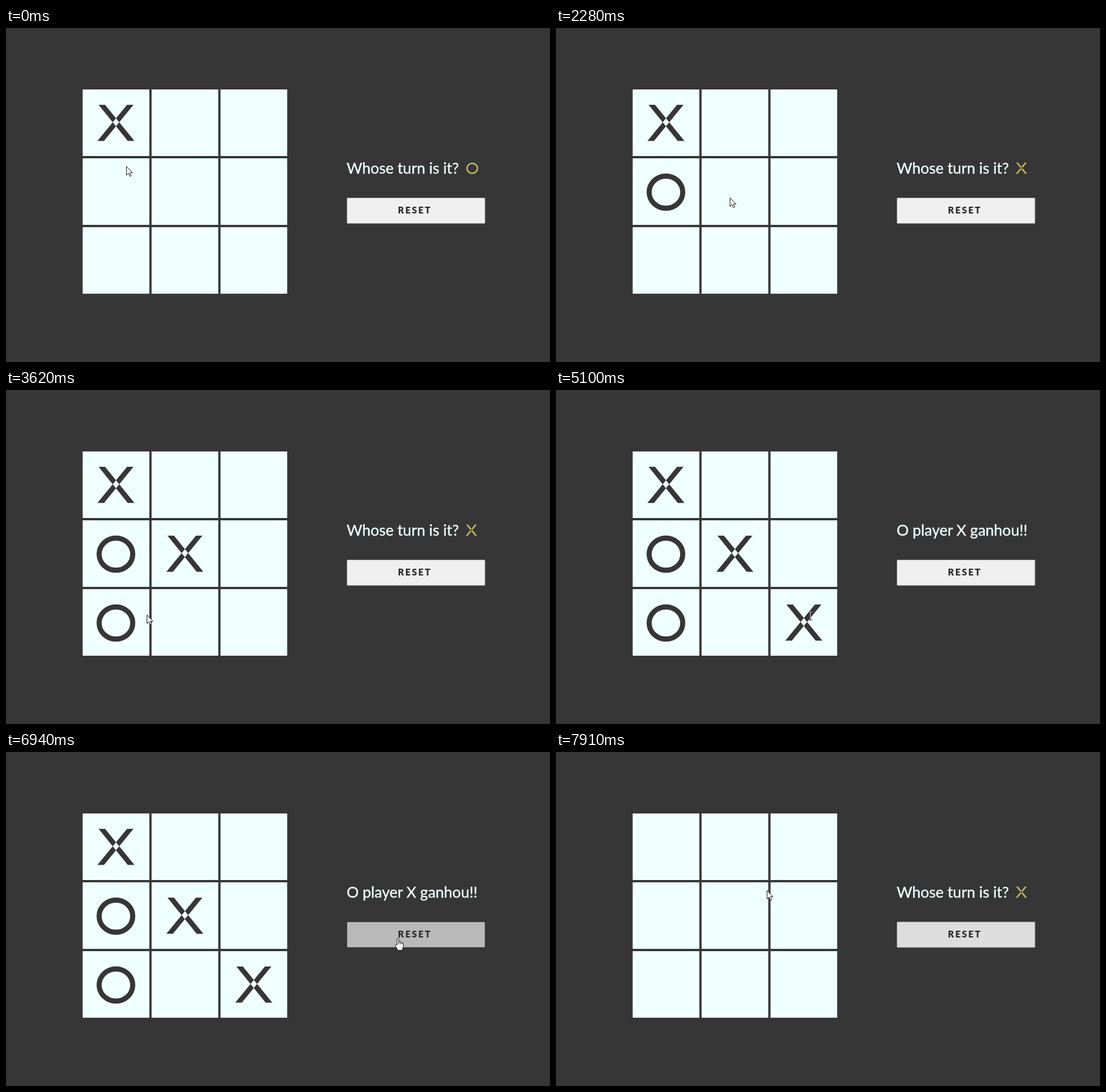
Animation, 955 px wide and 587 px high, one loop 8000 ms. Source, as an HTML page:

```html
<!DOCTYPE html>
<html lang="en">
<head>
<meta charset="utf-8">
<title>Tic-tac-toe</title>
<style>
  html, body { margin: 0; width: 100%; height: 100%; overflow: hidden; background: #363636; }
  svg { display: block; width: 955px; height: 587px; }
  text { font-family: Lato, "Open Sans", sans-serif; }
  #status { font-size: 26.5px; fill: azure; stroke: azure; stroke-width: .4px; }
  #label { font-size: 16px; font-weight: 900; letter-spacing: 2.4px; fill: #2b2b2b; }
  #board rect { fill: azure; }
  #board use { color: #363636; }
  #turn { color: #bfb362; }
  #arrow, #hand { fill: #fff; stroke: #111; stroke-linejoin: round; }
  #beam { fill: none; stroke: #fff; }
</style>
</head>
<body>
<svg viewBox="0 0 955 587">
  <defs>
    <path id="X" fill="currentColor" d="M-30.5-32h11.400L32.500 31.500h-11.700zM30.800-32h-11.300L-32.500 31.500h11.500z"/>
    <ellipse id="O" cy=".5" rx="29.500" ry="28.300" fill="none" stroke="currentColor" stroke-width="8.900"/>
    <path id="arrow" d="M.5.5V15.500L4 12.200 6.400 17.800 8.800 16.700 6.400 11.300H11z"/>
    <path id="beam" d="M-2.500-7h6M.5-7V7M-2.500 7h6"/>
    <path id="hand" d="M-1.500 12.500V2Q0-1.500 1.500 2V7Q4 4.500 4.300 7.500 6.500 6.500 7 8.500 9.500 8 9.500 10.500V14.500L7.500 21.500H0L-4.700 13.500Q-4 9.500-1.500 12.500M1.500 7v4M4.300 7.500V11M7 8.500V11"/>
  </defs>
  <g id="board"></g>
  <text id="status" x="598" y="256"></text>
  <use id="turn"/>
  <rect id="button" x="598.5" y="298.5" width="242.500" height="45.200" rx="1.500"/>
  <text id="label" x="688" y="326">RESET</text>
  <use id="cursor"/>
</svg>
<script>
const LOOP = 8000, STEP = 124, RESET = 7520;
const HOVER_IN = 6820, HOVER_OUT = 7770, FADE = 180;
const CELL = 117, PITCH = 121;

// X and O alternate.
const plays = [
  { time: 0, cell: 0 },
  { time: 1060, cell: 3 },
  { time: 2640, cell: 4 },
  { time: 3200, cell: 6 },
  { time: 4350, cell: 8 }
];

// Each glide eases from the previous stop; bow dips its path.
const glides = [
  { start: 0, steps: 1, x: 211, y: 243 },
  { start: 130, steps: 5, x: 211, y: 272 },
  { start: 1700, steps: 7, x: 328, y: 304 },
  { start: 2790, steps: 4, x: 224, y: 394 },
  { start: 3620, steps: 5, x: 443, y: 407 },
  { start: 5100, steps: 5, x: 472, y: 312 },
  { start: 5920, steps: 1, x: 348, y: 286 },
  { start: 6190, steps: 8, x: 703, y: 316, bow: 85 },
  { start: 7650, steps: 3, x: 370, y: 243 }
];

const $ = id => document.getElementById(id);
const clamp = v => Math.max(0, Math.min(1, v));
const smooth = u => u * u * (3 - 2 * u);
const center = cell => [193 + cell % 3 * PITCH, 167 + Math.floor(cell / 3) * PITCH];
const add = name => $('board').appendChild(document.createElementNS('http://www.w3.org/2000/svg', name));
const place = (node, shape, x, y, scale = 1) => {
  node.setAttribute('href', '#' + shape);
  node.setAttribute('transform', `translate(${x} ${y}) scale(${scale})`);
};

for (let cell = 0; cell < 9; cell++) {
  const [x, y] = center(cell), rect = add('rect');
  rect.setAttribute('x', x - CELL / 2 + .1);
  rect.setAttribute('y', y - CELL / 2 - .5);
  rect.setAttribute('width', CELL);
  rect.setAttribute('height', CELL);
}
const marks = plays.map(({ cell }, i) => {
  const mark = add('use');
  place(mark, 'XO'[i % 2], ...center(cell));
  return mark;
});

function cursorAt(t) {
  const i = glides.filter(glide => glide.start <= t).length - 1;
  const to = glides[i], from = glides[i - 1] || to;
  const u = clamp((Math.floor((t - to.start) / STEP) + 1) / to.steps);
  const mix = key => from[key] + (to[key] - from[key]) * smooth(u);
  const dip = (to.bow || 0) * Math.sin(Math.PI * u) ** 2;
  return [Math.round(mix('x')), Math.round(mix('y') + dip)];
}

function cursorShape(x, y, played) {
  if (x > 598 && x < 841 && y > 298 && y < 344) return 'hand';
  const overMark = plays.slice(0, played).some(({ cell }) => {
    const [cx, cy] = center(cell);
    return Math.abs(x - cx) < 34 && Math.abs(y - cy) < CELL / 2;
  });
  return overMark ? 'beam' : 'arrow';
}

function draw(t) {
  const played = t < RESET ? plays.filter(play => play.time <= t).length : 0;
  const won = played === plays.length;
  marks.forEach((mark, i) => mark.style.display = i < played ? '' : 'none');

  $('status').textContent = won ? 'O player X ganhou!!' : 'Whose turn is it?';
  $('turn').style.display = won ? 'none' : '';
  place($('turn'), 'XO'[played % 2], played % 2 ? 818.5 : 817, 246.5, .31);

  const hover = clamp((t - HOVER_IN) / FADE) - clamp((t - HOVER_OUT) / FADE);
  const gray = 239 - 81 * hover;
  $('button').style.fill = `rgb(${gray}, ${gray}, ${gray})`;
  $('button').style.stroke = hover > .5 ? '#404040' : '#808080';

  const [x, y] = cursorAt(t), shape = cursorShape(x, y, played);
  place($('cursor'), shape, x, y);
  $('cursor').style.mixBlendMode = shape === 'beam' ? 'difference' : 'normal';
}

function frame() {
  draw(performance.now() % LOOP);
  requestAnimationFrame(frame);
}
frame();
</script>
</body>
</html>
```
